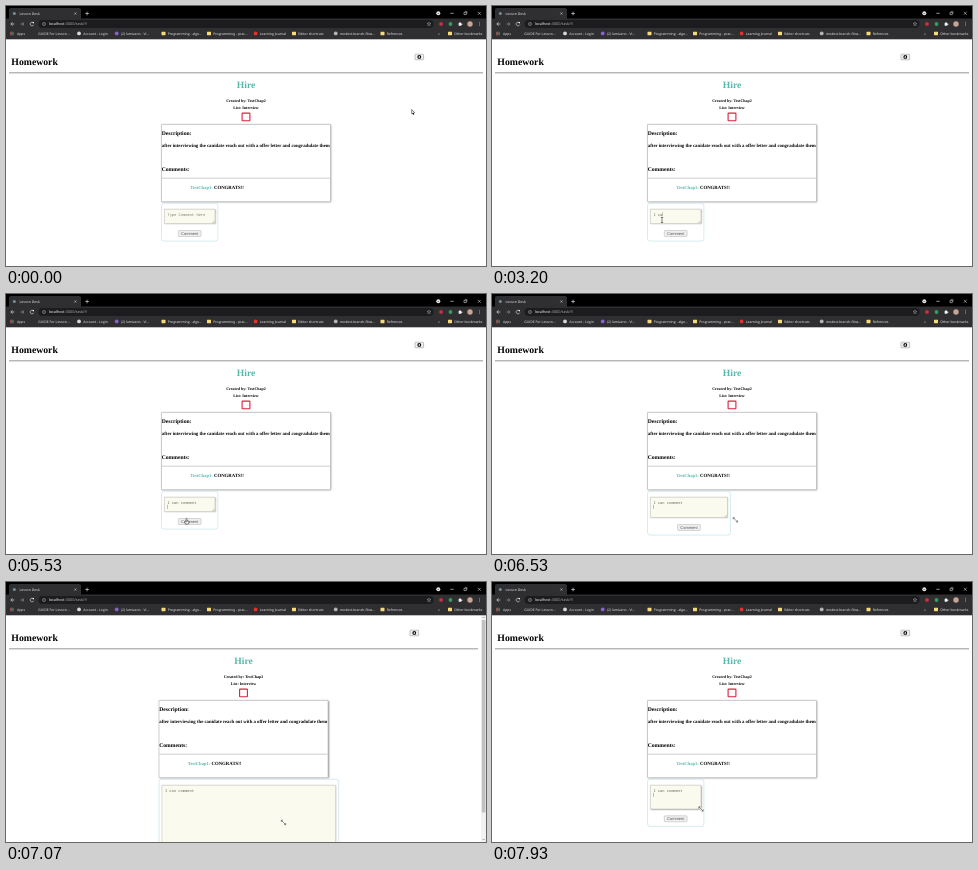
An HTML page with a canvas that plays this animation: 480 px wide and 260 px high, repeating every 8000 ms.

```html
<!DOCTYPE html>
<html lang="en">
<head>
<meta charset="utf-8">
<title>Task comment form</title>
<style>
  html, body { margin: 0; width: 100%; height: 100%; overflow: hidden; background: #fff; }
  canvas { display: block; width: 480px; height: 260px; }
</style>
</head>
<body>
<canvas id="stage"></canvas>
<script>
const W = 480, H = 260, LOOP = 8000, STEP = 1000 / 15;
const canvas = document.getElementById('stage');
const ratio = window.devicePixelRatio || 1;
canvas.width = W * ratio;
canvas.height = H * ratio;
const ctx = canvas.getContext('2d');

const SERIF = '"Liberation Serif", serif';
const SANS = '"Liberation Sans", sans-serif';
const UI = '"Open Sans", sans-serif';
const MONO = '"Liberation Mono", monospace';
const TEAL = '#55b9ac', BAR = '#2f2f32', LIGHT = '#f0f0f2', FOLDER = '#f6d978';
const CHAR = 2.235, AREA_TOP = 203.2;
const FOCUS = 2200, ENTER = 4400, DRAG = 6140, BLINK = 533, KEY_PACE = 65;

// The pointer rests at each stop until the next trip begins.
const STOPS = [
  { at: 0, trip: 1, x: 406, y: 104 },
  { at: 1467, trip: 133, x: 247.5, y: 241 },
  { at: 1800, trip: 1, x: 155, y: 234 },
  { at: 2200, trip: 400, x: 170, y: 214 },
  { at: 5530, trip: 260, x: 180.5, y: 225 },
  { at: 6130, trip: 460, x: 209, y: 217.7 },
  { at: 6533, trip: 333, x: 241.5, y: 225 },
  { at: 6800, trip: 267, x: 336.4, y: 267 },
  { at: 7200, trip: 200, x: 172, y: 193 },
  { at: 7600, trip: 333, x: 212, y: 227 },
  { at: 7867, trip: 134, x: 209, y: 227 }
];
const BURSTS = [['I', 2870], [' can', 3070], [' comm', 3600], ['ent', 4000]];
const MESSAGE = BURSTS.map(b => b[0]).join('');
const KEY_TIMES = BURSTS.flatMap(([keys, start]) => [...keys].map((_, i) => start + i * KEY_PACE));

const BOOKMARKS = [
  ['GUIDE For Lesson...', 28],
  ['Account - Login', 73, '#d5d8dc'],
  ['(2) lumivano - Vi...', 110.7, '#8a5fd0'],
  ['Programming - algo...', 157.5, FOLDER],
  ['Programming - prac...', 203, FOLDER],
  ['Learning Journal', 249.6, '#e0342f'],
  ['Editor shortcuts', 288, FOLDER],
  ['modest-branch-flow...', 329.7, '#aeb4ba'],
  ['Refrences', 376.5, FOLDER],
  ['Other bookmarks', 444, FOLDER]
];

function pointerAt(t) {
  const next = STOPS.findIndex(s => s.at > t);
  if (next < 0) return STOPS[STOPS.length - 1];
  const a = STOPS[next - 1], b = STOPS[next];
  const u = Math.max(0, 1 - (b.at - t) / b.trip);
  return { x: a.x + (b.x - a.x) * u, y: a.y + (b.y - a.y) * u };
}

// The dragged corner trails the pointer by one step; a narrow area grows from its centre.
function areaSize(t) {
  const { x, y } = pointerAt(Math.max(DRAG, t - STEP));
  return {
    tw: Math.max(6, Math.min(x - 158.4, 2 * (x - 170))),
    th: Math.max(6, y - AREA_TOP)
  };
}

function text(str, x, y, size, family, color = '#000', weight = 400, align = 'left') {
  ctx.font = `${weight} ${size}px ${family}`;
  ctx.fillStyle = color;
  ctx.textAlign = align;
  ctx.fillText(str, x, y);
}

function rect(x, y, w, h, color) {
  ctx.fillStyle = color;
  ctx.fillRect(x, y, w, h);
}

function box(x, y, w, h, fill, stroke, line = 0.6, radius = 0) {
  ctx.beginPath();
  ctx.roundRect(x, y, w, h, radius);
  if (fill) { ctx.fillStyle = fill; ctx.fill(); }
  if (stroke) { ctx.strokeStyle = stroke; ctx.lineWidth = line; ctx.stroke(); }
}

function shadowBox(x, y, w, h, fill, stroke, blur, alpha) {
  ctx.save();
  ctx.shadowColor = `rgba(0,0,0,${alpha})`;
  ctx.shadowBlur = blur * ratio;
  ctx.shadowOffsetX = ctx.shadowOffsetY = 0.6 * ratio;
  box(x, y, w, h, fill);
  ctx.restore();
  box(x, y, w, h, null, stroke);
}

function dot(x, y, r, color) {
  ctx.beginPath();
  ctx.arc(x, y, r, 0, Math.PI * 2);
  ctx.fillStyle = color;
  ctx.fill();
}

function arc(x, y, r, from, to, color, width) {
  ctx.beginPath();
  ctx.arc(x, y, r, from, to);
  ctx.strokeStyle = color;
  ctx.lineWidth = width;
  ctx.stroke();
}

function line(color, width, x, y, ...rest) {
  ctx.beginPath();
  ctx.moveTo(x, y);
  for (let i = 0; i < rest.length; i += 2) ctx.lineTo(rest[i], rest[i + 1]);
  ctx.strokeStyle = color;
  ctx.lineWidth = width;
  ctx.stroke();
}

function cross(x, y, r) {
  line(LIGHT, 0.5, x - r, y - r, x + r, y + r);
  line(LIGHT, 0.5, x - r, y + r, x + r, y - r);
}

function navArrow(x, dir, color) {
  line(color, 0.6, x - 1.8, 18, x + 1.8, 18);
  line(color, 0.6, x, 16.2, x + dir * 1.8, 18, x, 19.8);
}

function star(x, y, r) {
  ctx.beginPath();
  for (let i = 0; i < 10; i++) {
    const a = i * Math.PI / 5 - Math.PI / 2, d = i % 2 ? r * 0.45 : r;
    ctx.lineTo(x + Math.cos(a) * d, y + Math.sin(a) * d);
  }
  ctx.closePath();
  ctx.strokeStyle = '#c8c9cc';
  ctx.lineWidth = 0.4;
  ctx.stroke();
}

function tabStrip() {
  rect(0, 0, W, 13, '#000');
  box(3, 2, 72, 13, BAR, null, 0, 2);
  dot(8.3, 7.5, 1.5, '#78909c');
  text('Lesson Desk', 13.5, 8.7, 3.5, UI, LIGHT);
  cross(69.4, 7.5, 1);
  line(LIGHT, 0.6, 79.3, 7.5, 82.9, 7.5);
  line(LIGHT, 0.6, 81.1, 5.7, 81.1, 9.3);
  dot(432.3, 7.3, 2, '#e8e8e8');
  line('#222', 0.5, 431.3, 6.9, 432.3, 7.9, 433.3, 6.9);
  line(LIGHT, 0.6, 444.3, 7.3, 447.7, 7.3);
  box(458, 6.3, 2.3, 2.3, null, LIGHT, 0.5);
  line(LIGHT, 0.4, 458.8, 5.6, 461, 5.6, 461, 7.8);
  cross(473.3, 7.3, 1.5);
}

function toolbar() {
  rect(0, 12.5, W, 20.8, BAR);
  navArrow(6.6, -1, LIGHT);
  navArrow(16.2, 1, '#9a9b9f');
  arc(26, 18, 1.8, 0.4, 5.5, LIGHT, 0.6);
  rect(26.7, 16, 1.3, 1.3, LIGHT);
  box(32.5, 14, 395, 8, '#1c1c1f', null, 0, 4);
  arc(38, 18, 1.6, 0, 7, '#c4c5c8', 0.4);
  rect(37.8, 17, 0.45, 1.9, '#c4c5c8');
  text('localhost', 42.8, 19.4, 3.8, UI, '#fff');
  const hostEnd = 42.8 + ctx.measureText('localhost').width;
  text(':3000/task/9', hostEnd, 19.4, 3.8, UI, '#b0b2b6');
  star(423, 18, 1.9);
  dot(435, 18, 1.9, '#c9303c');
  dot(444.5, 18, 1.9, '#25a65a');
  box(452.6, 16.9, 2.8, 2.8, LIGHT, null, 0, 0.4);
  dot(454, 16.6, 0.7, LIGHT);
  dot(455.7, 18.3, 0.7, LIGHT);
  dot(464, 18, 2.7, '#c9a393');
  for (let i = -1; i <= 1; i++) dot(473.5, 18 + i * 1.6, 0.45, LIGHT);
}

function bookmarks() {
  const label = (str, x) => text(str, x, 28.8, 3.45, UI, LIGHT);
  for (let i = 0; i < 9; i++)
    rect(4.2 + i % 3 * 1.3, 25.8 + Math.floor(i / 3) * 1.3, 0.9, 0.9, `hsl(${i % 3 * 110} 55% 60%)`);
  label('Apps', 11);
  label('»', 432);
  for (const [name, x, color] of BOOKMARKS) {
    if (color === FOLDER) box(x - 2, 25.7, 4, 3.5, FOLDER, null, 0, 0.4);
    else if (color) dot(x, 27.4, 1.9, color);
    label(name, x + 4.2);
  }
}

function page(shift) {
  const mid = 240 - shift, left = 155.5 - shift, icon = 413.3 - shift * 2;
  const bold = (str, x, y, size, align, color = '#000') => text(str, x, y, size, SERIF, color, 700, align);
  bold('Homework', 5.3, 59.2, 9.75);
  box(icon - 4.3, 48.2, 8.6, 5.6, '#efefef', '#8c8c8c', 0.5, 0.6);
  dot(icon, 51, 1.9, '#000');
  dot(icon, 50.4, 0.6, '#efefef');
  box(icon - 1, 51.3, 2, 0.9, '#efefef', null, 0, 0.45);
  rect(3, 66.4, 474 - shift * 2, 0.9, '#8a8a8a');

  bold('Hire', mid, 82, 9.6, 'center', TEAL);
  bold('Created by: TestChap2', mid, 95.5, 4.03, 'center');
  bold('List: Interview', mid, 103.4, 4.03, 'center');
  box(mid - 3.9, 107.1, 7.8, 7.6, '#fff', '#dc2038', 1.1, 0.4);

  shadowBox(left, 118.4, 169, 77.3, '#fff', '#b4b4b4', 1.8, 0.45);
  bold('Description:', left + 0.2, 129, 5.65);
  bold('after interviewing the canidate reach out with a offer letter and congradulate them',
    left + 0.3, 141.2, 4.79);
  bold('Comments:', left + 0.2, 164.6, 5.65);
  rect(left + 0.4, 171.8, 168.2, 0.6, '#b0b0b0');
  bold('TestChap1:', left + 28.8, 182.7, 4.6, 'left', TEAL);
  bold('CONGRATS!!', left + 52.5, 182.7, 4.79);
}

function caretOn(t) {
  if (t < FOCUS) return false;
  const start = [FOCUS, ...KEY_TIMES, ENTER].filter(k => k <= t).pop();
  return Math.floor((t - start) / BLINK) % 2 === 0;
}

function areaText(t, x) {
  const typed = KEY_TIMES.filter(k => k <= t).length;
  const shown = typed ? MESSAGE.slice(0, typed) : 'Type Comment Here';
  text(shown, x, 209.6, CHAR / 0.6, MONO, typed ? '#66665c' : '#80807a');
  if (!caretOn(t)) return;
  const wrapped = t >= ENTER;
  rect(x + (wrapped ? 0 : typed * CHAR), wrapped ? 210.8 : 206.4, 0.4, 4.1, '#666');
}

function form(t, tw, th, shift) {
  const x = 155.5 - shift, w = Math.max(29, tw + 5.8), mid = x + w / 2;
  const ax = mid - tw / 2, bottom = AREA_TOP + th;
  box(x, 197.2, w, th + 23.4, '#fff', '#bddde6', 0.6, 2.6);
  shadowBox(ax, AREA_TOP, tw, th, '#fafaee', '#c2c2b8', 1.2, 0.3);
  if (tw < 14) {
    rect(ax + 1, AREA_TOP + 0.6, tw - 2, th - 1.2, '#d8d8d8');
    for (const y of [AREA_TOP + 2, bottom - 2]) line('#999', 0.5, mid - 1.2, y, mid + 1.2, y);
  } else {
    ctx.save();
    ctx.beginPath();
    ctx.rect(ax, AREA_TOP, tw, th);
    ctx.clip();
    areaText(t, ax + 3);
    ctx.restore();
    const rx = ax + tw - 0.6, ry = bottom - 0.6;
    for (const r of [1, 2.2]) line('#888', 0.4, rx - r, ry, rx, ry - r);
  }
  box(mid - 11.4, bottom + 6.8, 22.8, 6, '#efefef', '#b0b0b0', 0.5, 0.7);
  text('Comment', mid, bottom + 11.2, 4, SANS, '#555', 400, 'center');
}

function scrollbar(th) {
  const content = 194 + th;
  rect(475.2, 33.3, 4.8, 226.7, '#f1f1f1');
  rect(475.8, 38, 3.6, 227 / content * 217, '#c1c1c1');
  for (const [y, dir] of [[36, -1], [257, 1]])
    line('#777', 0.6, 476.6, y, 477.6, y + dir, 478.6, y);
}

function resizeCursor(x, y) {
  line('#fff', 1.4, x - 2, y - 2, x + 2, y + 2);
  line('#444', 0.6, x - 2, y - 2, x + 2, y + 2);
  for (const s of [-1, 1])
    line('#444', 0.6, x + 2.2 * s, y + 0.5 * s, x + 2.2 * s, y + 2.2 * s, x + 0.5 * s, y + 2.2 * s);
}

function textCursor(x, y) {
  line('#333', 0.6, x, y - 2.4, x, y + 2.4);
  for (const s of [-2.5, 2.5]) line('#333', 0.6, x - 1.2, y + s, x + 1.2, y + s);
}

function handCursor(x, y) {
  box(x - 1.6, y + 1.8, 4, 3.2, '#fff', '#000', 0.5, 1);
  box(x - 0.5, y - 0.6, 1, 3.6, '#fff', '#000', 0.4, 0.5);
}

function arrowCursor(x, y) {
  line('#000', 1.3, x + 1, y + 2.6, x + 2, y + 4.8);
  ctx.beginPath();
  ctx.moveTo(x, y);
  ctx.lineTo(x, y + 4.2);
  ctx.lineTo(x + 3, y + 3);
  ctx.closePath();
  ctx.fillStyle = '#fff';
  ctx.strokeStyle = '#000';
  ctx.lineWidth = 0.5;
  ctx.fill();
  ctx.stroke();
}

function pointer(t) {
  if (t >= 1530 && t < 1800) return;
  const { x, y } = pointerAt(t);
  const within = (x0, x1, y0, y1) => x > x0 && x < x1 && y > y0 && y < y1;
  if (t >= DRAG - STEP) resizeCursor(x, y);
  else if (within(158.5, 209.5, 203, 218)) textCursor(x, y);
  else if (within(172.5, 195.5, 223.5, 231)) handCursor(x, y);
  else arrowCursor(x - 0.3, y - 0.4);
}

function render(now) {
  const t = Math.floor((now % LOOP + 5) / STEP) * STEP + 5;
  const { tw, th } = areaSize(t);
  const overflow = th > 39.5, shift = overflow ? 2.5 : 0;
  ctx.setTransform(ratio, 0, 0, ratio, 0, 0);
  ctx.textRendering = 'geometricPrecision';
  rect(0, 0, W, H, '#fff');
  page(shift);
  form(t, tw, th, shift);
  if (overflow) scrollbar(th);
  tabStrip();
  toolbar();
  bookmarks();
  pointer(t);
}

const began = performance.now();
function tick() {
  render(performance.now() - began);
  requestAnimationFrame(tick);
}
tick();
</script>
</body>
</html>
```
